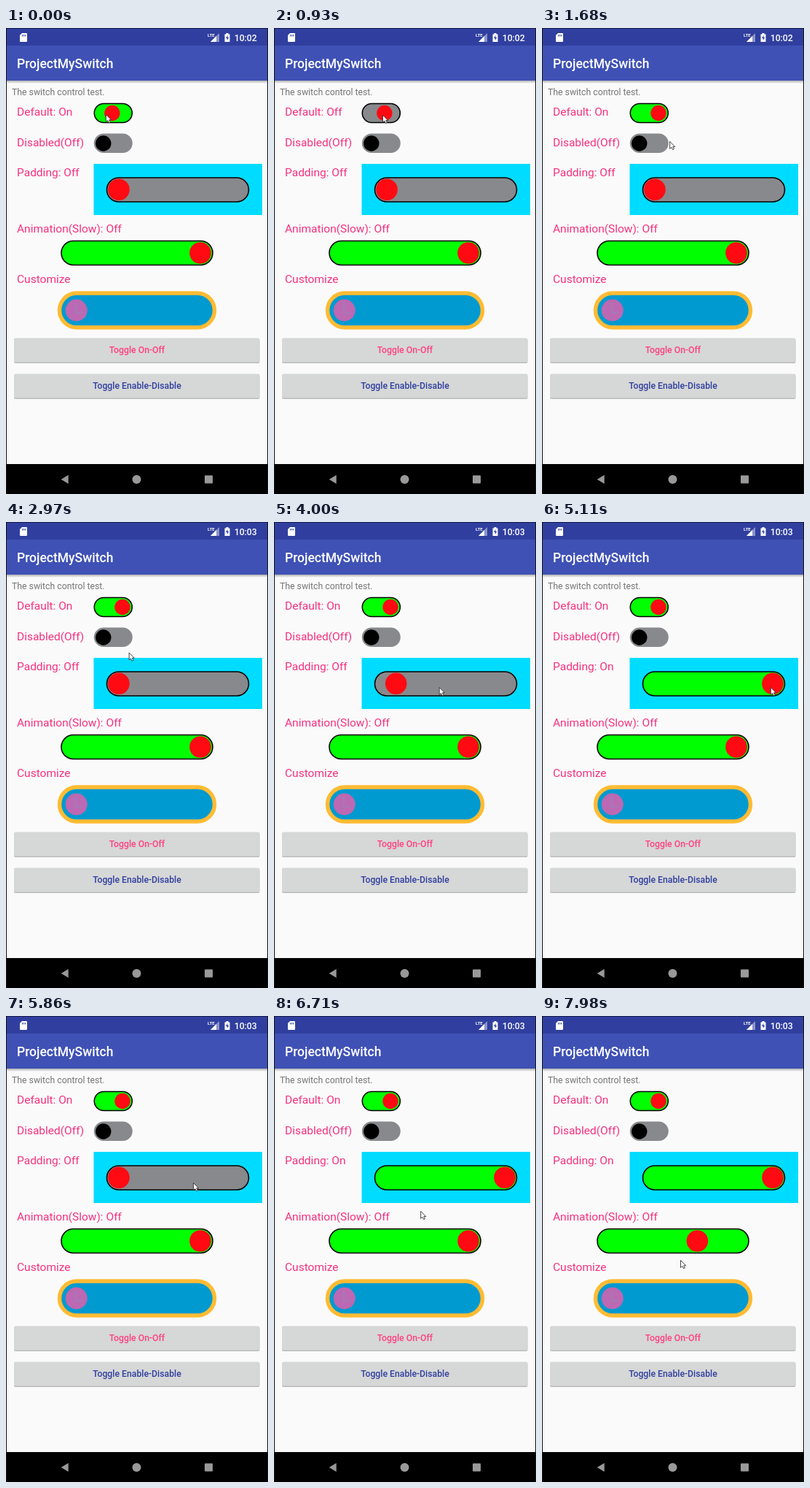
Recreate the animation shown at these times as an HTML page. Size 360 px wide and 638 px high, loop 8000 ms.

```html
<!DOCTYPE html>
<html lang="en">
<head>
<meta charset="utf-8">
<title>Switch control test</title>
<style>
  html, body { margin: 0; width: 100%; height: 100%; overflow: hidden; background: #fafafa; }
  svg { display: block; width: 100%; height: 100%; font-family: Roboto, sans-serif; }
  .label { font-size: 15.5px; fill: #f5317f; }
  .button { font-size: 12.25px; font-weight: 500; text-anchor: middle; }
  .track { stroke: #000; stroke-width: 1.6; }
  .thumb { fill: #ff0a12; }
</style>
</head>
<body>
<svg viewBox="0 0 360 638">
  <defs>
    <linearGradient id="shade" x2="0" y2="1">
      <stop stop-color="#000" stop-opacity=".3"/>
      <stop offset="1" stop-color="#000" stop-opacity="0"/>
    </linearGradient>
    <g id="plate">
      <rect x="11" y="1.5" width="337.5" height="33" rx="2" fill="#bbb"/>
      <rect x="11" width="337.5" height="33" rx="2" fill="#d6d7d7"/>
    </g>
  </defs>
  <rect width="360" height="638" fill="#fafafa"/>

  <!-- status bar and toolbar -->
  <rect width="360" height="24" fill="#303f9f"/>
  <rect y="24" width="360" height="48" fill="#3f51b5"/>
  <rect y="72" width="360" height="4" fill="url(#shade)"/>
  <g fill="#fff">
    <path d="M22 7h6q1 0 1 1v10q0 1-1 1h-8q-1 0-1-1v-8z"/>
    <path d="M22.5 9v2.5m2-2.5v2.5m2-2.5v2.5" stroke="#303f9f"/>
    <text x="277" y="12" font-size="6" font-weight="700">LTE</text>
    <path d="M293 7v12h-12z" opacity=".45"/>
    <path d="M289 11v8h-8z"/>
    <path d="M302.500 7h3v1.500h2v10.500h-7v-10.500h2z"/>
    <path d="M304.500 10l-2.500 4h1.700v3l2.500-4h-1.700z" fill="#303f9f"/>
    <text id="clock" x="313.700" y="18" font-size="12.25" font-weight="500"></text>
    <text x="15" y="55" font-size="17.5" font-weight="500">ProjectMySwitch</text>
  </g>

  <!-- switches -->
  <text x="8" y="92" font-size="12.25" fill="#757575">The switch control test.</text>
  <text class="label" id="defaultLabel" x="15" y="120"></text>
  <rect class="track" id="defaultTrack" x="121.300" y="103.500" width="52" height="26" rx="13"/>
  <circle class="thumb" id="defaultThumb" cy="116.500" r="10.700"/>

  <text class="label" x="15" y="161.500">Disabled(Off)</text>
  <rect x="120.800" y="144.500" width="53" height="26.500" rx="13.250" fill="#88898c"/>
  <circle cx="133.800" cy="158" r="10.700"/>

  <text class="label" id="paddingLabel" x="15" y="203"></text>
  <rect x="120.500" y="186" width="231.500" height="70" fill="#00dcff"/>
  <rect class="track" id="paddingTrack" x="138.500" y="205" width="195" height="33" rx="16.500"/>
  <circle class="thumb" id="paddingThumb" cy="221.300" r="14.800"/>

  <text class="label" x="15" y="279.700">Animation(Slow): Off</text>
  <rect class="track" x="76" y="291.500" width="208" height="33" rx="16.500" fill="#0f0"/>
  <circle class="thumb" id="slowThumb" cy="308" r="14.800"/>

  <text class="label" x="15" y="349">Customize</text>
  <rect x="73.500" y="363" width="213" height="47" rx="23.500" fill="#009ad0" stroke="#ffbb33" stroke-width="5.500"/>
  <circle cx="96.700" cy="386.500" r="15" fill="#bd68b2"/>
  <path d="M96 376v14h9" fill="none" stroke="#a976b8" stroke-width="3"/>

  <!-- buttons -->
  <use href="#plate" y="424.500"/>
  <use href="#plate" y="473.500"/>
  <text class="button" x="180" y="445" fill="#ff4081">Toggle On-Off</text>
  <text class="button" x="180" y="494" fill="#303f9f">Toggle Enable-Disable</text>

  <!-- navigation bar -->
  <rect y="597" width="360" height="41"/>
  <g fill="#999">
    <path d="M75.700 618l10-6v12z"/>
    <circle cx="179.500" cy="618" r="6"/>
    <rect x="273" y="612.500" width="11" height="11" rx="1"/>
  </g>
  <path d="M.5 0v638M359.500 0v638"  stroke="#111"/>
  <path d="M0 .5h360" stroke="#000" stroke-opacity=".5"/>

  <path id="cursor" d="M.5 .5v10l2.300-2 1.700 3.300 1.800-.9-1.600-3.100h3z" fill="#fff" stroke="#333" stroke-width=".9"/>
</svg>
<script>
const LOOP = 8000;
const TOUCH_SLOP = 8;
const PADDING_TRAVEL = 162;
const el = id => document.getElementById(id);

function showSwitch(id, name, x, on) {
  el(id + 'Thumb').setAttribute('cx', x);
  el(id + 'Track').setAttribute('fill', on ? '#0f0' : '#88898c');
  el(id + 'Label').textContent = `${name}: ${on ? 'On' : 'Off'}`;
}

function draw(t) {
  const ramp = (from, to) => Math.min(1, Math.max(0, (t - from) / (to - from)));

  // Default switch: dragged off, then on again.
  const flickOff = ramp(0, 120), flickOn = ramp(780, 1000);
  showSwitch('default', 'Default', 146 - 12 * flickOff + 26 * flickOn, t < 180 || t >= 1020);

  // Padding switch: dragged on, pulled back and forth, then tapped off and on.
  const drag = 108 * ramp(3850, 4195) ** 2;
  const pulled = Math.max(0, drag - TOUCH_SLOP);
  const settle = (PADDING_TRAVEL - pulled) * ramp(4195, 4390);
  const wiggle = Math.sin(Math.PI * ramp(4630, 5080));
  const taps = ramp(6350, 6600) - ramp(5470, 5740);
  showSwitch('padding', 'Padding',
    155 + pulled + settle - 118 * wiggle + PADDING_TRAVEL * taps,
    (t >= 4390 && t < 5740) || t >= 6600);

  // Slow switch: one second, accelerating and decelerating.
  const slow = (1 - Math.cos(Math.PI * ramp(7610, 8610))) / 2;
  el('slowThumb').setAttribute('cx', 267 - 177 * slow);

  let x = 137, y = 118;
  const move = (dx, dy, px, py = px) => { x += dx * px; y += dy * py; };
  move(-12, 0, flickOff);
  move(35, 1, flickOn);
  move(24, 28, ramp(1200, 1500));
  const swing = ramp(1500, 1860);
  move(-35, 11, swing ** 2, Math.sqrt(swing));
  move(-10, 2, ramp(2070, 2190));
  move(15, -1, ramp(2400, 2610));
  move(52, 69, ramp(2760, 3510));
  move(1, -2, drag, ramp(3850, 4000));
  move(-126, 0, wiggle);
  move(-57, 2, ramp(5110, 5410));
  move(-95, 82, ramp(6470, 6880), ramp(6470, 6980));
  move(-26, 0, ramp(7160, 7250));
  move(54, 24, ramp(7740, 7980));
  el('cursor').setAttribute('transform', `translate(${x} ${y})`);

  el('clock').textContent = t < 2500 ? '10:02' : '10:03';
}

const start = performance.now();
function tick() {
  draw((performance.now() - start) % LOOP);
  requestAnimationFrame(tick);
}
tick();
</script>
</body>
</html>
```
